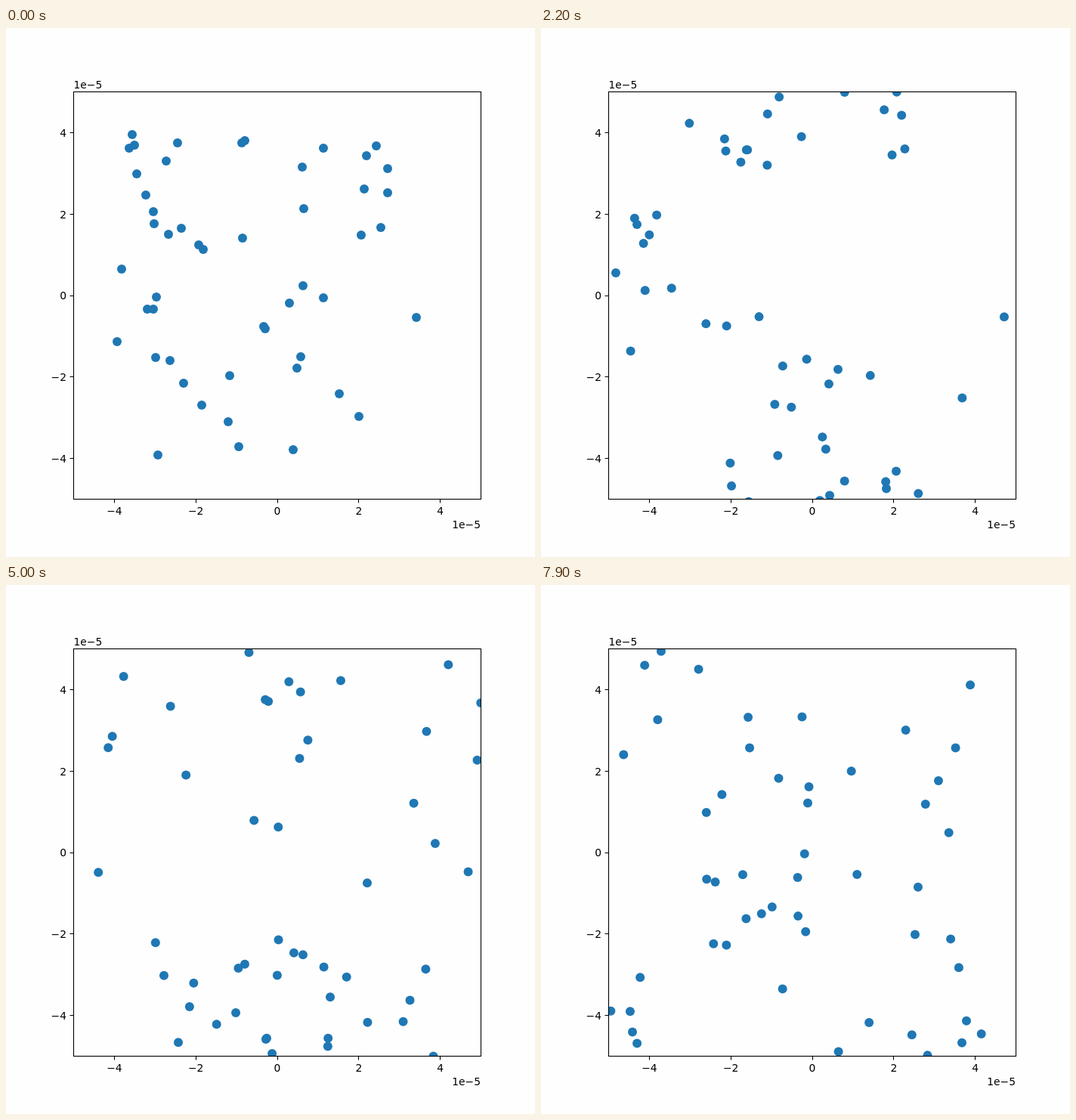
An HTML page for the animation above (8000 ms loop, 700 px wide and 700 px high).

```html
<!DOCTYPE html>
<html lang="en">
<head>
<meta charset="utf-8">
<title>Moving particles</title>
<style>
  html, body { margin: 0; width: 100%; height: 100%; overflow: hidden; background: #fefefe; }
  svg { display: block; width: 100vw; height: 100vh; }
  text { font: 13.89px "DejaVu Sans", sans-serif; fill: #000; }
</style>
</head>
<body>
<svg id="plot" viewBox="0 0 700 700">
  <clipPath id="area"><rect x="89.5" y="84.5" width="539" height="539"/></clipPath>
  <g id="dots" clip-path="url(#area)" fill="#1f77b4"></g>
  <g id="axes" stroke="#000" stroke-width="1.1" fill="none">
    <rect x="89.5" y="84.5" width="539" height="539"/>
  </g>
  <g id="labels">
    <text x="89.5" y="80">1e−5</text>
    <text x="628" y="662" text-anchor="end">1e−5</text>
  </g>
</svg>
<script>
const STEP_MS = 100, STEPS = 80, SPEED = 4.9;
const LOW = { x: 86, y: 81 }, SPAN = 546;

// Starting positions
const START = [
  [167, 141], [163, 159], [170, 155], [227, 152], [212, 176],
  [173, 193], [185, 221], [195, 243], [196, 259], [232, 265],
  [215, 273], [255, 287], [261, 293], [153, 319], [199, 356],
  [187, 372], [195, 372], [147, 415], [198, 436], [217, 440],
  [235, 470], [259, 499], [296, 460], [294, 521], [308, 554],
  [201, 565], [312, 152], [316, 149], [313, 278], [392, 184],
  [420, 159], [394, 239], [477, 169], [490, 156], [505, 186],
  [474, 213], [505, 218], [496, 264], [470, 274], [393, 341],
  [375, 364], [420, 357], [341, 395], [343, 398], [543, 383],
  [390, 435], [385, 450], [441, 484], [467, 514], [380, 558]
];

// Local flow: a particle takes the heading (degrees) of the nearest entry
const FLOW = [
  [165, 152, 105], [205, 195, -40], [225, 268, -62], [262, 300, 102],
  [150, 330, 140], [180, 425, -125], [240, 475, 95], [370, 375, 95],
  [510, 450, 80], [380, 558, -84], [480, 180, -104]
];

function svgNode(parent, tag, attrs, text = '') {
  const node = document.createElementNS('http://www.w3.org/2000/svg', tag);
  for (const key in attrs) node.setAttribute(key, attrs[key]);
  node.textContent = text;
  return document.getElementById(parent).appendChild(node);
}

function seeded(seed) {
  return () => (seed = (seed * 16807) % 2147483647) / 2147483647;
}

const wrap = (value, low) => low + (((value - low) % SPAN) + SPAN) % SPAN;

function headingAt(x, y) {
  const distance = ([fx, fy]) => Math.hypot(fx - x, fy - y);
  const nearest = FLOW.reduce((a, b) => distance(b) < distance(a) ? b : a);
  return nearest[2] * Math.PI / 180;
}

// Constant speed, a slowly wandering heading and periodic walls
function trace([x, y], random) {
  let angle = headingAt(x, y) + (random() - 0.5) * 0.3;
  const path = [];
  for (let step = 0; step < STEPS; step++) {
    path.push([x, y]);
    angle += (random() - 0.5) * Math.min(0.4, step * 0.02);
    x = wrap(x + SPEED * Math.cos(angle), LOW.x);
    y = wrap(y + SPEED * Math.sin(angle), LOW.y);
  }
  return path;
}

for (let value = -4; value <= 4; value += 2) {
  const x = 359 + value * 53.9, y = 354 - value * 53.9;
  const label = String(value).replace('-', '−');
  svgNode('axes', 'path', { d: `M${Math.floor(x) + 0.5} 624v4.5M89 ${Math.floor(y) + 0.5}h-4.5` });
  svgNode('labels', 'text', { x, y: 644, 'text-anchor': 'middle' }, label);
  svgNode('labels', 'text', { x: 80, y: y + 5.3, 'text-anchor': 'end' }, label);
}

const random = seeded(4217);
const particles = START.map(point => ({
  path: trace(point, random),
  node: svgNode('dots', 'circle', { r: 6 })
}));

function draw(ms) {
  const step = Math.floor(ms / STEP_MS) % STEPS;
  for (const { path, node } of particles) {
    node.setAttribute('cx', path[step][0]);
    node.setAttribute('cy', path[step][1]);
  }
}

const begin = performance.now();
function tick() {
  draw(performance.now() - begin);
  requestAnimationFrame(tick);
}
draw(0);
requestAnimationFrame(tick);
</script>
</body>
</html>
```
